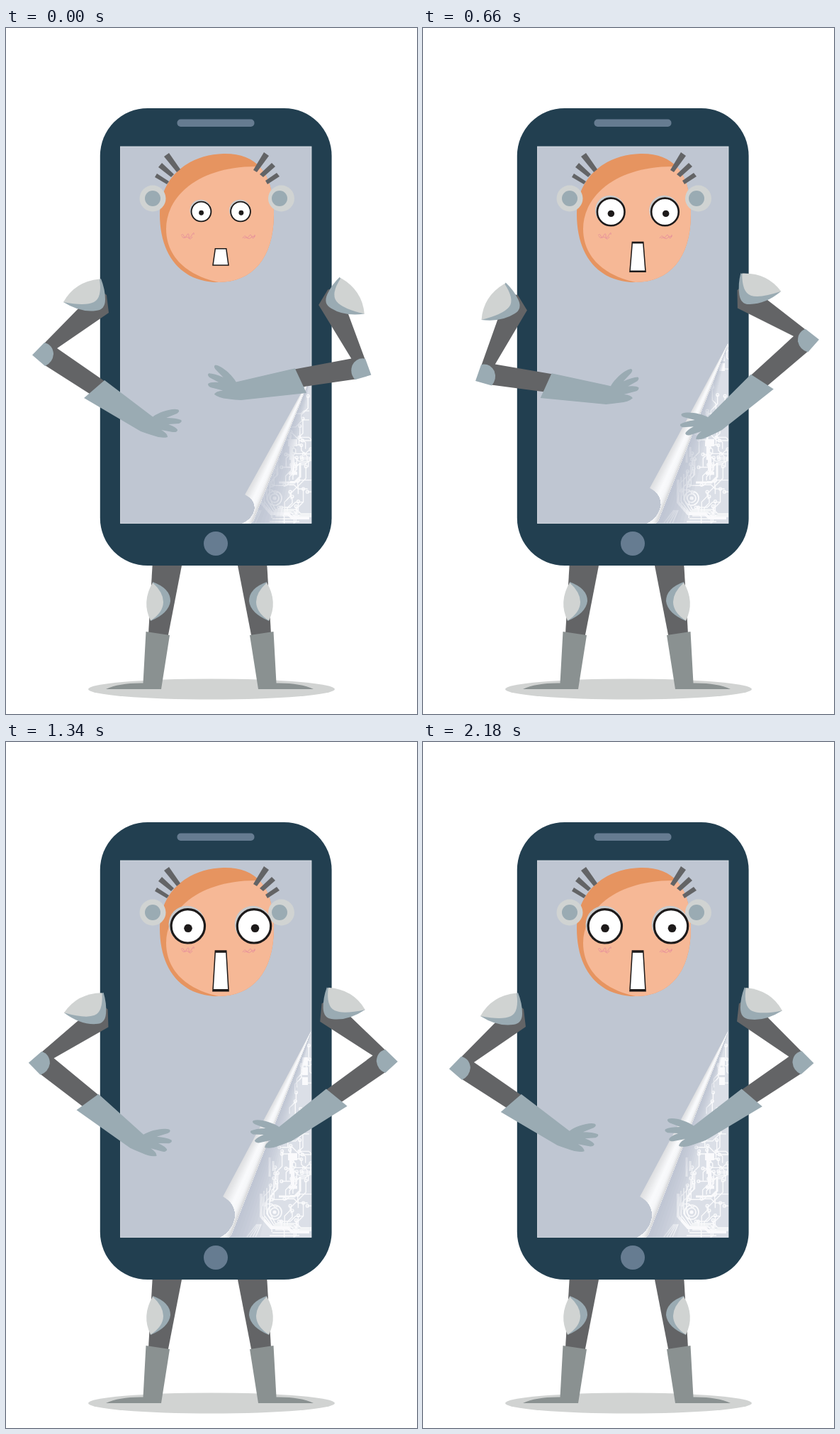
Recreate the animation shown at these times as an HTML page. Size 580x966 px, loop 2.2 s.

```html
<!DOCTYPE html>
<html lang="en">
<head>
<meta charset="utf-8">
<title>Phone robot</title>
<style>
  html, body { margin: 0; width: 100%; height: 100%; overflow: hidden; background: #fff; }
  svg { display: block; width: 100vw; height: 100vh; }
  .dark { fill: #636466; }
  .steel { fill: #9aabb3; }
  .pale { fill: #d0d3d2; }
  .boot { fill: #8a9191; }
  .navy { fill: #223f50; }
  .slate { fill: #667c91; }
  .ink { fill: #fff; stroke: #1d1a1a; }
  .hair path { fill: #636466; }
  .blush { fill: none; stroke: #e58f9c; stroke-width: 1; stroke-opacity: .85; }
  #traces { fill: none; stroke: #fff; stroke-width: 1.4; opacity: .85; }
  #traces .solid { fill: #fff; stroke: none; }
</style>
</head>
<body>
<svg viewBox="0 0 580 966">
  <defs>
    <g id="leg">
      <path class="dark" d="M207 750H248V757L228.500 857L201 853Z"/>
      <path class="boot" d="M197.500 850L231 855L219 931H141Q160 922 193.500 922.500Z"/>
      <path class="steel" d="M207 780Q232 789 232 807Q230 824 204 835Z"/>
      <path class="pale" d="M207 781Q191 808 204 834.500Q222 823 222 808Q222 795 207 781Z"/>
    </g>
    <g id="arm">
      <path class="dark" d="M54 444L108 389L136 372L142 376L145 401L72 451L140 498L121 517L55 475Z"/>
      <path class="steel" d="M37 460.500L54 443Q66 446 67 459Q66 471 55 476Z"/>
      <path class="steel" d="M139 496L207 547.500C216 541 234 535 243 537.500Q246 540 241 543L226 549Q240 549 247 552Q249 555 244 557L229 558Q240 562 242 566Q241 570 235 569L219 566Q228 571 228 576Q220 578.500 208 574Q198 571 190 568L110 521Z"/>
      <path class="steel" d="M81 386Q105 401 127 398Q140 397 140 382Q140 368 134 353Z"/>
      <path class="pale" d="M81 386Q97 357 132 353.500Q136 380 124 386Q112 392 81 386Z"/>
    </g>
    <g id="eye">
      <circle cx="-1.500" cy="-2.800" r="25.800" fill="#c8cacc"/>
      <circle class="ink" r="23.700" stroke-width="3.200"/>
    </g>
    <path id="head" d="M307 177C354 176 378 205 378 262C378 325 347 358 300 358C247 358 217 320 217 262C217 210 258 178 307 177Z"/>
    <clipPath id="headClip"><use href="#head"/></clipPath>
    <clipPath id="openClip"><path id="open"/></clipPath>
    <clipPath id="rollClip"><path id="roll"/></clipPath>
    <clipPath id="screenClip"><path d="M161.500 167H431V697.500H161.500Z"/></clipPath>
  </defs>

  <ellipse cx="290" cy="931" rx="174" ry="14.500" fill="#d1d3d2"/>
  <use href="#leg"/>
  <use href="#leg" transform="translate(575) scale(-1 1)"/>

  <rect class="navy" x="132.800" y="113" width="326.800" height="644" rx="67"/>
  <rect class="slate" x="241.500" y="128.500" width="109" height="10.500" rx="5"/>
  <circle class="slate" cx="296" cy="726" r="17"/>
  <rect x="161.500" y="167" width="269.500" height="530.500" fill="#bfc6d2" stroke="#dfe3e9" stroke-width=".8"/>

  <g clip-path="url(#screenClip)">
    <g clip-path="url(#openClip)">
      <rect x="280" y="390" width="152" height="308" fill="#dbdfe7"/>
      <g id="traces"></g>
      <g id="shade" fill="#b4bccb" fill-opacity=".13"></g>
    </g>
    <g id="sheen" clip-path="url(#rollClip)"></g>
  </g>

  <use href="#head" fill="#e69460"/>
  <path clip-path="url(#headClip)" fill="#f6b896" d="M358 195L400 190V370H300V358C260 350 226 325 226 283C226 235 275 193 358 195Z"/>
  <g class="hair">
    <path d="M223 181L230 176L246 199L241 203Z"/>
    <path d="M215 196L220 190L237 206L233 210Z"/>
    <path d="M210 210L213 205L230 216L227 220Z"/>
    <path d="M364 175L371 180L354 203L349 200Z"/>
    <path d="M375 190L380 195L363 210L358 206Z"/>
    <path d="M382 204L386 209L369 220L366 215Z"/>
  </g>
  <circle class="pale" cx="207" cy="240" r="18.500"/>
  <circle class="steel" cx="207" cy="240" r="11"/>
  <circle class="pale" cx="388.500" cy="240" r="18.500"/>
  <circle class="steel" cx="386" cy="240" r="11"/>
  <path class="blush" d="M247 292q3-3 4 1t4-1t3 1t4-1t3-1M248 293q2 4 5 2t5 1t5-2"/>
  <path class="blush" d="M334 296q3-5 5-2t4-1t4 1t4-2M336 296q3-2 5 0t5-1t5-1v-3"/>
  <g id="eyeL"><use href="#eye"/><circle cx=".2" cy="3" r="5.800" fill="#1d1a1a"/></g>
  <g id="eyeR"><use href="#eye"/><circle cx="1.500" cy="3" r="5.800" fill="#1d1a1a"/></g>
  <path id="mouth" class="ink" stroke-width="1.500" d="M-7.500-11.600H8L11.200 11.600H-10.800Z"/>

  <use id="armL" href="#arm"/>
  <use id="armR" href="#arm"/>
</svg>
<script>
const LOOP = 2200, GROW = 1200, BOTTOM = 698;
const LEFT_SWING = [[0, 0], [600, -28.4], [1200, 5.6], [2200, 0]];
const RIGHT_SWING = [[0, 24.2], [600, -9.4], [1200, 6.5], [1700, -22.3], [2200, 0.5]];
const SHEEN = [[0, 222], [0.25, 236], [0.5, 250], [0.75, 246], [0.9, 233], [1, 216]];
const SLICES = 16, SHADES = 8;

const $ = id => document.getElementById(id);
const mix = (a, b, p) => a + (b - a) * p;
const set = (el, name, value) => el.setAttribute(name, value);

function add(parent, tag, attrs) {
  const el = document.createElementNS("http://www.w3.org/2000/svg", tag);
  for (const key in attrs) set(el, key, attrs[key]);
  parent.appendChild(el);
  return el;
}

// Piecewise linear value at x
function along(keys, x) {
  let i = 1;
  while (i < keys.length - 1 && x > keys[i][0]) i++;
  const [x0, y0] = keys[i - 1], [x1, y1] = keys[i];
  return mix(y0, y1, (x - x0) / (x1 - x0));
}

function buildCircuit() {
  const g = $("traces");
  let seed = 11;
  const rnd = () => (seed = seed * 16807 % 2147483647) / 2147483647;
  const line = (d, w) => add(g, "path", { d, "stroke-width": w || 1.4 });
  const box = (x, y, width, height) => add(g, "rect", { x, y, width, height, class: "solid" });

  for (let i = 0; i < 58; i++) {
    const y = 425 + Math.sqrt(rnd()) * 255;
    const x = 430 - rnd() * (y - 405) * 0.27;
    const bend = (rnd() < 0.5 ? -1 : 1) * (3 + rnd() * 8);
    const run = 6 + rnd() * 16, tail = 4 + rnd() * 10;
    const flat = rnd() < 0.4;
    line(flat
      ? `M${x} ${y}h${run}l${Math.abs(bend)} ${bend}h${tail}`
      : `M${x} ${y}v${run}l${bend} ${Math.abs(bend)}v${tail}`);
    add(g, "circle", { cx: x, cy: y, r: 1.9 });
  }
  for (const r of [10, 6]) add(g, "circle", { cx: 379, cy: 662, r, "stroke-width": 1.7 });
  add(g, "circle", { cx: 379, cy: 662, r: 2.6, class: "solid" });
  for (let i = 0; i < 4; i++) {
    const k = i * 4;
    line(`M${360 + k} ${636 - k}V${668 - k / 2}L${374 + k / 2} ${684 - k / 2}H${398 + k}l6 6h24`, i ? 1.5 : 4);
    line(`M${340 + k} 697l${14 - k / 2}-18`, 1.6);
    line(`M${372 + k} ${695 - k}h${42 - k}`, 1.4);
  }
  box(398, 579, 13, 10);
  line("M402 586V606H405V627M399 627H411", 4.5);
  for (let i = 0; i < 3; i++) box(418, 444 + i * 14, 8, 11);
  line("M372 585V612M377 590V604M385 640h22l8-8v-20", 3);
}

function buildSlices() {
  for (let i = 0; i < SLICES; i++) {
    const v = Math.round(along(SHEEN, i / (SLICES - 1)));
    add($("sheen"), "path", { fill: `rgb(${v},${v + 1},${v + 3})` });
  }
  for (let i = 0; i < SHADES; i++) add($("shade"), "path", {});
}

function drawCurl(p) {
  const top = [431, mix(488, 406, p)];
  const x = mix(337, 306, p), y = mix(657, 640, p);
  const h = BOTTOM - y, bulge = 6 + 0.2 * h;
  const foot = [x + 12, BOTTOM - 4];
  set($("open"), "d", `M${top}L${foot}L${x + 2} ${BOTTOM}H432V${top[1]}Z`);
  set($("roll"), "d", `M${top}L${x} ${y}Q${x + bulge} ${y + 0.15 * h} ${x + bulge} ${y + 0.48 * h}` +
    `Q${x + bulge * 0.8} ${y + 0.85 * h} ${x - 4} ${BOTTOM}H${x + 8}L${foot}Z`);

  // Each slice covers the rest of the cone, so no seams show
  [...$("sheen").children].forEach((el, i) => {
    const q = i / SLICES;
    const ex = mix(x, foot[0], q), ey = mix(y, foot[1], q);
    const bx = ex + (ex - top[0]) * 0.3, by = ey + (ey - top[1]) * 0.3;
    set(el, "d", `M${top}L${bx} ${by}L${x - 40} ${BOTTOM + 90}L${foot[0] + 30} ${BOTTOM + 30}L${foot}Z`);
  });
  [...$("shade").children].forEach((el, i) => {
    const reach = 5 + i * 5;
    set(el, "d", `M${top}L${x - 12} ${BOTTOM}H${foot[0] + reach}Z`);
  });
}

function draw(t) {
  const p = Math.min(t / GROW, 1);
  const size = mix(0.587, 1, p), eyeY = mix(258.5, 259.3, p);
  set($("eyeL"), "transform", `translate(${mix(275.5, 256.8, p)} ${eyeY}) scale(${size})`);
  set($("eyeR"), "transform", `translate(${mix(331, 350, p)} ${eyeY}) scale(${size})`);
  set($("mouth"), "transform", `translate(302.8 322.4) scale(1 ${mix(1, 2.36, p)})`);
  drawCurl(p);
  set($("armL"), "transform", `rotate(${along(LEFT_SWING, t)} 138 395)`);
  set($("armR"), "transform", `translate(588 -7.5) scale(-1 1) rotate(${-along(RIGHT_SWING, t)} 138 395)`);
}

buildCircuit();
buildSlices();
const start = performance.now();
function tick() {
  draw((performance.now() - start) % LOOP);
  requestAnimationFrame(tick);
}
tick();
</script>
</body>
</html>
```
